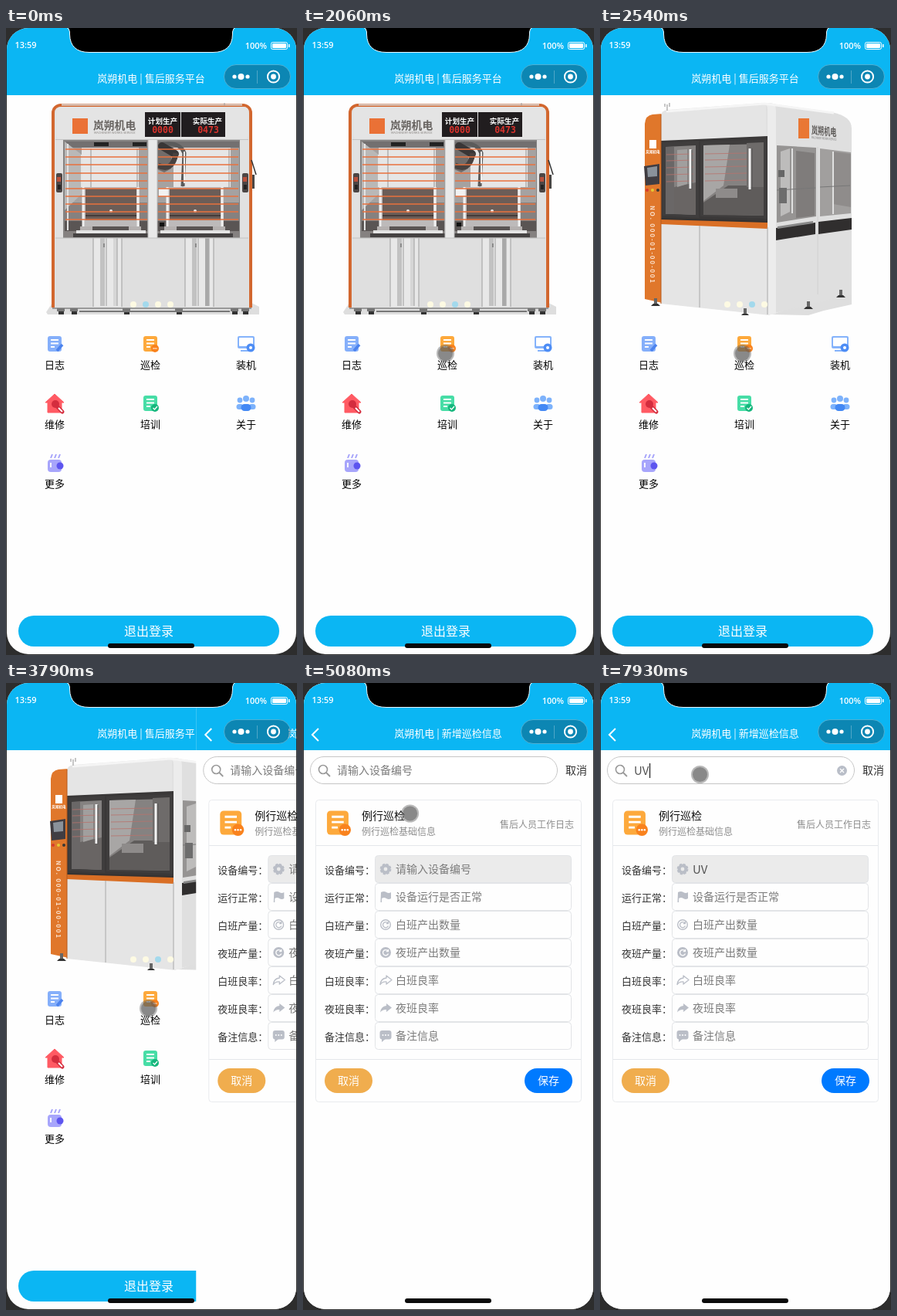
Animation, 377 px wide and 812 px high, one loop 8000 ms. Source, as an HTML page:

```html
<!DOCTYPE html>
<html lang="zh-CN">
<head>
<meta charset="utf-8">
<style>
html, body { margin: 0; width: 100%; height: 100%; overflow: hidden; background: #2d2d2d }
svg { display: block; width: 377px; height: 812px; font-family: "Noto Sans CJK SC", "Noto Sans CJK", "Noto Sans", sans-serif }
text { white-space: pre }
.led { font-family: "DejaVu Sans Mono", monospace; font-weight: 700 }
.status { font-family: "Open Sans", "Noto Sans", sans-serif; font-weight: 600 }
</style>
</head>
<body>
<svg id="stage" viewBox="0 0 377 812"></svg>
<script>
const BLUE = '#0bb6f3', BRAND = '岚朔机电';

// Shape helpers
const rect = (x, y, w, h, fill, r = 0, extra = '') =>
  `<rect x="${x}" y="${y}" width="${w}" height="${h}" rx="${r}" fill="${fill}" ${extra}/>`;
const circle = (x, y, r, fill, extra = '') => `<circle cx="${x}" cy="${y}" r="${r}" fill="${fill}" ${extra}/>`;
const shape = (d, fill, extra = '') => `<path d="${d}" fill="${fill}" ${extra}/>`;
const line = (d, color, w = 1, extra = '') => `<path d="${d}" fill="none" stroke="${color}" stroke-width="${w}" ${extra}/>`;
// y is the vertical middle of the glyphs
const text = (x, y, size, fill, s, anchor = 'start', extra = '') =>
  `<text x="${x}" y="${y + size * .38}" font-size="${size}" fill="${fill}" text-anchor="${anchor}" ${extra}>${s}</text>`;
const group = (id, body, extra = '') => `<g id="${id}" ${extra}>${body}</g>`;
const at = (x, y, body, k = 1) => `<g transform="translate(${x} ${y}) scale(${k})">${body}</g>`;
const each = (list, f) => list.map(f).join('');
const bold = 'font-weight="700"';

function frontMachine() {
  const half = (x, box) =>
    rect(x, 147, 107, 124, '#a5a2a1') +
    rect(x, 147, 107, 8, '#737070') +
    shape(`M${x + 22} 155H${x + 96}V206H${x + 22}Z`, '#e6e6e6') +
    line(`M${x + 34} 156V206M${x + 94} 156V206`, '#bdbdbd', 2) +
    shape(`M${x} 226H${x + 107}V271H${x}Z`, '#858180') +
    rect(x, 250, 107, 13, '#5a5554') +
    rect(box, 206, 74, 51, '#bdbaba') +
    rect(box + 4, 208, 66, 41, '#6b5d57') +
    line(`M${box + 1} 206V264M${box + 72} 206V264`, '#f0f0f0', 3) +
    line(`M${box + 4} 243H${box + 70}`, '#443b39', 2) +
    circle(box + 37, 237, 2, '#eee') +
    rect(box - 8, 262, 90, 4, '#e4e4e4') +
    rect(box - 12, 266, 98, 5, '#454242') +
    rect(box - 3, 257, 16, 5, '#b5b1b0') + rect(box + 60, 257, 16, 5, '#b5b1b0');
  const beams = each([157, 167, 177, 188, 198, 208, 218, 228, 238, 248], y =>
    line(`M77 ${y}H183M197 ${y}H301`, '#e9713e', 1.3));
  const column = (x, shade) =>
    rect(x, 272, 37, 89, '#e8e8e8') + rect(x + 9, 272, 6, 88, '#c2c2c2') + rect(x + 26, 272, 5, 88, shade) +
    line(`M${x} 272V361M${x + 17} 272V360M${x + 31} 272V360M${x + 37} 272V361`, '#aaa', 1.2) +
    rect(x + 13, 279, 2, 5, '#888');
  const handle = x =>
    rect(x, 188, 8, 25, '#4c4645', 2) + rect(x + 1, 193, 5, 6, '#b8503c') + rect(x + 2, 203, 4, 6, '#222');
  return shape('M52 368L60 356H318L328 361V371H54Z', '#dedede') +
    rect(59, 98, 260, 120, '#d2672f', 12) + rect(59, 130, 260, 232, '#d2672f') +
    shape('M63 363V110Q63 102 72 102H307Q315 102 315 110V363Z', '#e1e1e1') +
    rect(65, 102, 249, 42, '#e4e4e4', 6) +
    line('M64 144.500H314', '#c4c4c4') + line('M72 99.500H306', '#dcd8d6', 2) +
    line('M283 97v3', '#999') +
    rect(86, 117, 20, 20, '#ea7136') +
    text(113, 126, 13.8, '#686461', BRAND, 'start', bold) +
    text(114, 135, 4, '#8b8784', 'MACHINERY WORKS SERVICE') +
    rect(180, 109, 46, 32, '#211d1f') + rect(227, 109, 57, 32, '#211d1f') +
    text(203, 120, 9.6, '#fff', '计划生产', 'middle', bold) +
    text(261, 120, 9.6, '#fff', '实际生产', 'middle', bold) +
    text(203, 132, 11.5, '#d8322c', '0000', 'middle', 'class="led"') +
    text(262, 132, 11.5, '#d8322c', '0473', 'middle', 'class="led"') +
    rect(74, 145, 229, 127, '#868483') +
    half(76, 99) + half(195, 208) +
    rect(114, 148, 19, 5, '#222') + rect(164, 148, 18, 5, '#222') +
    shape('M76 147L98 164V215L76 236Z', '#b9b8b7') +
    line('M80 150V262M98 164V206', '#e4e4e4', 2) +
    shape('M196 150H214V182L205 187L196 183Z', '#716c6a') +
    line('M200 151Q225 146 231 162L229 205', '#5b5b5b', 5) +
    line('M231 160V201', '#eee', 2) +
    line('M202 153L219 163', '#393636', 10, 'stroke-linecap="round"') +
    line('M197 178Q216 187 220 162', '#47413f', 7) +
    rect(198, 208, 10, 10, '#f2f2f2') +
    beams + rect(184, 145, 12, 127, '#e9e9e9') + line('M184 145V272M196 145V272', '#b9b9b9') +
    rect(199, 252, 6, 5, '#111') +
    handle(65) + handle(306) +
    line('M318 171L324 190', '#333', 1.5) + rect(319, 190, 3, 18, '#4a4644') +
    rect(64, 272, 250, 91, '#dfdfdf') + column(113, '#d6d6d6') + column(232, '#a9a9a9') +
    line('M64 272H314', '#c2c2c2') + line('M60 363H318', '#9a9a9a', 2) +
    each([71, 88, 156, 224, 296, 310], x => rect(x - 5, 363, 10, 4, '#777') + rect(x - 3, 367, 7, 4, '#333')) +
    line('M95 367H290', '#777', 2);
}

function sideMachine() {
  const foot = (x, y) => rect(x - 2, y - 7, 4, 7, '#666') + shape(`M${x - 6} ${y + 3}L${x - 3} ${y}H${x + 3}L${x + 6} ${y + 3}Z`, '#333');
  const door = (x, y, w, h) =>
    shape(`M${x} ${y}l${w} -3v${h + 4}l${-w} -3z`, '#3f3d3d') +
    shape(`M${x + 4} ${y + 5}l${w - 8} -2v${h - 6}l${8 - w} -2z`, '#858281');
  return shape('M222 371L300 345L326 337V358L290 366L270 372Z', '#dedede') +
    shape('M58 124Q59 113 68 112L81 111V356L58 351Z', '#e0772b') +
    shape('M79 114Q79 107 87 106L211 97Q220 97 220 105V372L79 357Z', '#e5e5e5') +
    shape('M215 97L300 109Q326 114 326 130V345L219 371Z', '#dfdfdf') +
    shape('M209 97H222Q228 98 228 107V370L217 372V105Q217 98 209 97Z', '#ececec') +
    line('M86 108L213 98L303 110', '#f5f5f5', 3) +
    line('M87 107V99M84 98V102M90 97V102', '#aaa', 1.3) +
    shape('M79 146L217 140V251L79 247Z', '#3a3838') +
    door(81, 149, 47, 96) + door(130, 147, 86, 99) +
    // Dim interior seen through the doors
    shape('M85 154H96V241H85Z', '#6a6767') + shape('M96 206L124 200V242L96 241Z', '#696564') +
    shape('M100 158L113 157V202L100 206Z', '#a19f9e') +
    shape('M134 152L168 151L160 204L134 224Z', '#a8a6a5') +
    shape('M134 226L166 204H212V243L134 242Z', '#5f5c5b') +
    shape('M190 149L212 148V206L190 206Z', '#6e6b6a') + rect(150, 208, 28, 12, '#8e8b8a') +
    each([164, 172, 181, 190, 199], y => line(`M86 ${y}L121 ${y - 1}M136 ${y - 1}L190 ${y - 2}`, '#b8736d', .8)) +
    line('M117 157V208M194 156V209', '#f3f3f3', 3) + line('M119 158V209M197 156V209', '#555') +
    shape('M79 247L217 251V260L79 254Z', '#d96f25') + line('M79 247L217 251', '#353231', 2) +
    line('M129 256V362M217 258V371', '#a8a8a8') + line('M79 112V357', '#b75a1d') +
    shape('M229 152L280 155V244L229 252Z', '#969493') + shape('M285 156L325 161V240L285 244Z', '#a19f9e') +
    shape('M234 160L246 156V238L234 244Z', '#bdbcbb') + shape('M254 159L278 162V243L254 246Z', '#7f7c7b') +
    shape('M302 160L325 163V232L302 228Z', '#8f8c8b') + line('M249 156V240M302 160V241', '#e0e0e0', 2) +
    line('M229 210L279 207M285 206L324 204', '#777') + rect(231, 184, 8, 9, '#666') + rect(232, 207, 10, 20, '#6d6d6d') +
    shape('M228 259L279 252V267L228 275Z', '#302e2e') + shape('M283 251L326 246V261L283 267Z', '#302e2e') +
    shape('M230 257L276 250V253L230 260Z', '#888') +
    line('M282 154V345', '#d0d0d0') +
    shape('M257 117h14v26h-14z', '#e97734') +
    `<g transform="translate(274 132) skewY(5) scale(.58 1)">${text(0, 0, 14, '#5e5b59', BRAND, 'start', bold)}${text(0, 9.5, 4.2, '#777', 'MACHINERY WORKS SERVICE')}</g>` +
    rect(64, 145, 9, 11, '#fff') + text(68.5, 160, 4.6, '#fff', BRAND, 'middle', bold) +
    shape('M57 179L77 176V202L59 204Z', '#403d42') + shape('M61 181L74 179V192L62 193Z', '#8a929b') +
    circle(61, 210, 2, '#d6392d') + circle(68, 210, 2, '#e5c934') + circle(75, 210, 2, '#3a3836') +
    `<text transform="translate(65 230) rotate(90)" font-size="8" letter-spacing="1.7" fill="#fbe3d0" ${bold}>NO. 000-01-00-001</text>` +
    foot(72, 357) + foot(188, 370) + foot(270, 361) + foot(312, 346);
}

const sheet = (c, dark) =>
  rect(-9, -10, 18, 20, c, 3) + line('M-5 -5H5M-5 -.5H5M-5 4H0', '#fff', 1.8) + (dark ? circle(6, 6, 5, dark) : '');
const menu = [
  ['日志', sheet('#85affa') + line('M3 9L10 1', '#4c83ee', 3.6)],
  ['巡检', sheet('#fda93c', '#f9821d') + line('M3.5 6H8.5', '#fff', 1.4, 'stroke-dasharray="1.2 .8"')],
  ['装机', rect(-11, -10, 22, 16, '#85b3fb', 2) + rect(-9, -8, 18, 11, '#fff', 1) + rect(-7, 8, 11, 2, '#85b3fb') +
    circle(6, 5, 5.5, '#4e8df5') + circle(6, 5, 2, '#fff')],
  ['维修', shape('M0 -12L12 -1H9V12H-9V-1H-12Z', '#ff5a63', 'stroke="#ff5a63" stroke-linejoin="round"') +
    circle(1, 1, 5, '#d42d3e') + line('M3 4L10 11', '#d42d3e', 5, 'stroke-linecap="round"') + line('M5 6L10 11', '#fff', 2)],
  ['培训', sheet('#47dda6', '#15b67c') + line('M3.5 6L5.5 8L9 4', '#fff', 1.3)],
  ['关于', each([-8, 8], x => circle(x, -4, 3.4, '#7db2fb') + rect(x - 4.5, 1, 9, 7, '#7db2fb', 3.5)) +
    circle(0, -6, 4, '#7db2fb') + rect(-6.5, 1, 13, 9, '#4388f4', 4.5)],
  ['更多', rect(-9, -4, 18, 16, '#a7a5fb', 4) + line('M-5 -6l2 -5M0 -6l2 -5M5 -6l2 -5', '#a7a5fb', 2) +
    circle(7, 4, 4.5, '#5d55ef') + line('M-5 0V6', '#fff', 1.8)]
];

const header = title => rect(0, 0, 377, 87, BLUE) + text(188, 65, 13, '#fff', `${BRAND} | ${title}`, 'middle');

function home() {
  return rect(0, 0, 377, 812, '#fefefe') + header('售后服务平台') +
    `<g clip-path="url(#banner)">${group('slideA', frontMachine())}${group('slideB', sideMachine())}</g>` +
    each([0, 1, 2, 3], i => circle(165 + 16 * i, 358, 4, '#fdfae3', `id="dot${i}"`)) +
    each(menu, ([name, icon], i) => {
      const x = 63 + 124 * (i % 3), y = 409 + 77 * Math.floor(i / 3);
      return at(x, y, icon) + text(x, y + 27, 13, '#000', name, 'middle');
    }) +
    rect(16, 761, 338, 40, BLUE, 20) + text(185, 781, 16, '#fff', '退出登录', 'middle');
}

const GREY = '#babec7';
const reload = c => line('M3 -2A3.6 3.6 0 1 0 3.5 1.5M3.4 -4V-1.4H.8', c, 1.3);
const share = 'M1 -6L8 -.5L1 5V2Q-4 1.5 -7 5.5Q-6 -2.5 1 -3Z';
const fields = [
  ['设备编号', '请输入设备编号', circle(0, 0, 4.4, 'none', `stroke="${GREY}" stroke-width="4"`) +
    circle(0, 0, 6.2, 'none', `stroke="${GREY}" stroke-width="2.4" stroke-dasharray="3 1.87"`)],
  ['运行正常', '设备运行是否正常', shape('M-6 -6Q-2 -8 1 -6T7 -6V2Q4 4 1 2T-5 2V7H-6.5Z', GREY)],
  ['白班产量', '白班产出数量', circle(0, 0, 6.3, 'none', `stroke="${GREY}" stroke-width="1.4"`) + reload(GREY)],
  ['夜班产量', '夜班产出数量', circle(0, 0, 7, GREY) + reload('#fff')],
  ['白班良率', '白班良率', line(share, GREY, 1.3, 'stroke-linejoin="round"')],
  ['夜班良率', '夜班良率', shape(share, GREY)],
  ['备注信息', '备注信息', rect(-7.5, -7, 15, 11.5, GREY, 3) + shape('M-5 3V8L1 3Z', GREY) + each([-3.5, 0, 3.5], x => circle(x, -1, 1, '#fff'))]
];

function form() {
  return rect(0, 0, 377, 812, '#fefefe') + header('新增巡检信息') +
    line('M20 59L12 67L20 75', '#fff', 2) +
    rect(9.5, 95.5, 320, 35, '#fff', 17.5, 'stroke="#c6c6c6"') +
    circle(26, 112, 5.5, 'none', 'stroke="#999" stroke-width="1.6"') + line('M30 116L35 121', '#999', 1.8) +
    group('hint', text(44, 113, 14, '#7b7b7b', '请输入设备编号')) +
    text(340, 113, 14, '#333', '取消') +
    rect(16.5, 151.5, 344, 391, '#fefefe', 4, 'stroke="#e9ebee"') +
    line('M17 210.5H360M17 487.5H360', '#e4e6ea') +
    at(45, 181, sheet('#fda93c', '#f9821d') + each([3.7, 6, 8.3], x => circle(x, 6, .8, '#fff')), 1.55) +
    text(76, 172, 14, '#111', '例行巡检') + text(76, 192.5, 12, '#8d8d8d', '例行巡检基础信息') +
    text(351, 183.5, 12, '#8d8d8d', '售后人员工作日志', 'end') +
    each(fields, ([label, hint, icon], i) => {
      const y = 241 + 36 * i;
      return text(28, y + 1, 13, '#333', label + '：') +
        rect(93.5, y - 17.5, 254, 35, i ? '#fefefe' : '#ebebeb', 4, 'stroke="#e2e4e7"') +
        at(107, y, icon) + group('field' + i, text(120, y, 14, '#7b7b7b', hint));
    }) +
    group('fieldUV', text(120, 241, 15, '#555', 'UV')) +
    rect(28, 499, 62, 32, '#f0ad4e', 16) + text(59, 515, 14, '#fff', '取消', 'middle') +
    rect(287, 499, 62, 32, '#007aff', 16) + text(318, 515, 14, '#fff', '保存', 'middle') +
    `<text id="typed" x="44" y="119" font-size="15" fill="#555"></text>` +
    group('clear', circle(313.5, 113.5, 6.5, '#b9bec8') + line('M311 111L316 116M316 111L311 116', '#fff', 1.2)) +
    rect(0, 104, 1.2, 19, '#222', 0, 'id="caret"') +
    group('ime', rect(.5, 128.5, 163, 39, '#fff', 2, 'stroke="#dcdcdc"') +
      `<text id="option" x="10" y="153" font-size="14" fill="#333"></text>`);
}

const chrome =
  text(11.5, 21.5, 11, '#fff', '13:59', 'start', 'class="status"') +
  text(338, 23, 11, '#fff', '100%', 'end', 'class="status"') +
  rect(343.5, 18.5, 21, 9, 'none', 2, 'stroke="#fff"') + rect(345, 20, 18, 6, '#fff', 1) + rect(366, 21, 1.5, 4, '#fff') +
  shape('M78 -1Q82 0 82.5 5V8Q83 31.5 108 31.5H268Q293 31.5 293.5 8V5Q294 0 298 -1Z', '#000', 'stroke="#e9f7fd"') +
  rect(282.5, 47.5, 86, 31, 'rgba(15,25,30,.3)', 15.5, 'stroke="#5fb6d6" stroke-width=".8"') +
  circle(296, 63, 2.6, '#fff') + circle(304.5, 63, 4, '#fff') + circle(313, 63, 2.6, '#fff') +
  line('M325.5 55V72', '#4fa6c8') +
  circle(346.5, 63, 7.6, 'none', 'stroke="#fff" stroke-width="2"') + circle(346.5, 63, 3.4, '#fff') +
  rect(132, 797, 112, 6, '#0a0a0a', 3);

const pointer = group('pointer',
  group('touch', circle(0, 0, 11.5, 'rgba(90,90,90,.42)') + circle(0, 0, 9.5, 'rgba(90,90,90,.5)')) +
  group('arrow', shape('M0 -1V15.5L3.8 12L6.5 18L9 17L6.5 11H11.5Z', '#fff', 'stroke="#111"')) +
  group('cross', line('M-6 0H6M0 -6V6', '#000', 2) +
    shape('M0 -8L3.5 -4H-3.5ZM0 8L3.5 4H-3.5ZM-8 0L-4 -3.5V3.5ZM8 0L4 -3.5V3.5Z', '#000')));

document.getElementById('stage').innerHTML =
  `<defs><clipPath id="phone">${rect(1, 0, 375, 811, '#000', 28)}</clipPath>
  <clipPath id="banner">${rect(1, 87, 375, 285, '#000')}</clipPath></defs>` +
  rect(0, 0, 377, 812, '#2d2d2d') +
  `<g clip-path="url(#phone)">${group('home', home())}${group('form', form())}${chrome}${pointer}</g>`;

const $ = id => document.getElementById(id);
const show = (id, on) => $(id).setAttribute('visibility', on ? 'inherit' : 'hidden');
const move = (id, x, y = 0) => $(id).setAttribute('transform', `translate(${x} ${y})`);
const within = (t, a, b) => t >= a && t < b;

// The screen refreshes at these moments: [first, last, count]
const ticks = [[0, 0, 1], [770, 770, 1], [910, 1510, 6], [1660, 1910, 3], [2060, 2540, 5], [3790, 3910, 2],
  [4060, 4200, 2], [4600, 5200, 6]].flatMap(([a, b, n]) =>
  Array.from({ length: n }, (_, i) => n > 1 ? a + (b - a) * i / (n - 1) : a));
const path = [[770, 365, 765.5], [1510, 201.5, 433.5], [1910, 186.5, 421.5], [2060, 184.5, 421.5],
  [4480, 184.5, 421.5], [5200, 129.5, 118.5]];

function pointerAt(t) {
  const i = path.findIndex(p => p[0] > t);
  if (i < 0) return path[path.length - 1].slice(1);
  if (!i) return path[0].slice(1);
  const [a, b] = [path[i - 1], path[i]], k = (t - a[0]) / (b[0] - a[0]);
  return [a[1] + (b[1] - a[1]) * k, a[2] + (b[2] - a[2]) * k];
}

const progress = (t, start, length) => Math.min(1, Math.max(0, (t - start) / length));

function draw(t) {
  const q = ticks.filter(s => s <= t + .01).pop();

  const swipe = 356 * (1 - (1 - progress(q, 2060, 480)) ** 2);
  move('slideA', -swipe);
  move('slideB', 356 - swipe);
  for (let i = 0; i < 4; i++) $('dot' + i).setAttribute('fill', i === (t < 2060 ? 1 : 2) ? '#a3d9ec' : '#fdfae3');

  show('form', q >= 3790);
  move('form', 376 * (1 - progress(q, 3740, 380)) ** 3);

  const typed = t < 7110 ? '' : t < 7260 ? 'U' : 'UV', done = t >= 7930;
  const caretX = [44, 53.5, 64][typed.length];
  $('typed').textContent = typed;
  $('typed').setAttribute('text-decoration', done ? 'none' : 'underline');
  $('option').textContent = '1 ' + typed;
  show('hint', !typed);
  show('ime', typed && !done);
  move('ime', caretX);
  show('clear', done);
  show('field0', !done);
  show('fieldUV', done);
  $('caret').setAttribute('x', caretX);
  show('caret', within(t, 5350, 5880) || within(t, 6440, 6960) || within(t, 7110, 7780) || done);

  const arrow = within(t, 4060, 4600), cross = within(t, 6840, 6960);
  show('pointer', t >= 770);
  show('arrow', arrow);
  show('cross', cross);
  show('touch', !arrow && !cross);
  move('pointer', ...pointerAt(q));
}

const start = performance.now();
function loop() {
  draw((performance.now() - start) % 8000);
  requestAnimationFrame(loop);
}
loop();
</script>
</body>
</html>
```
